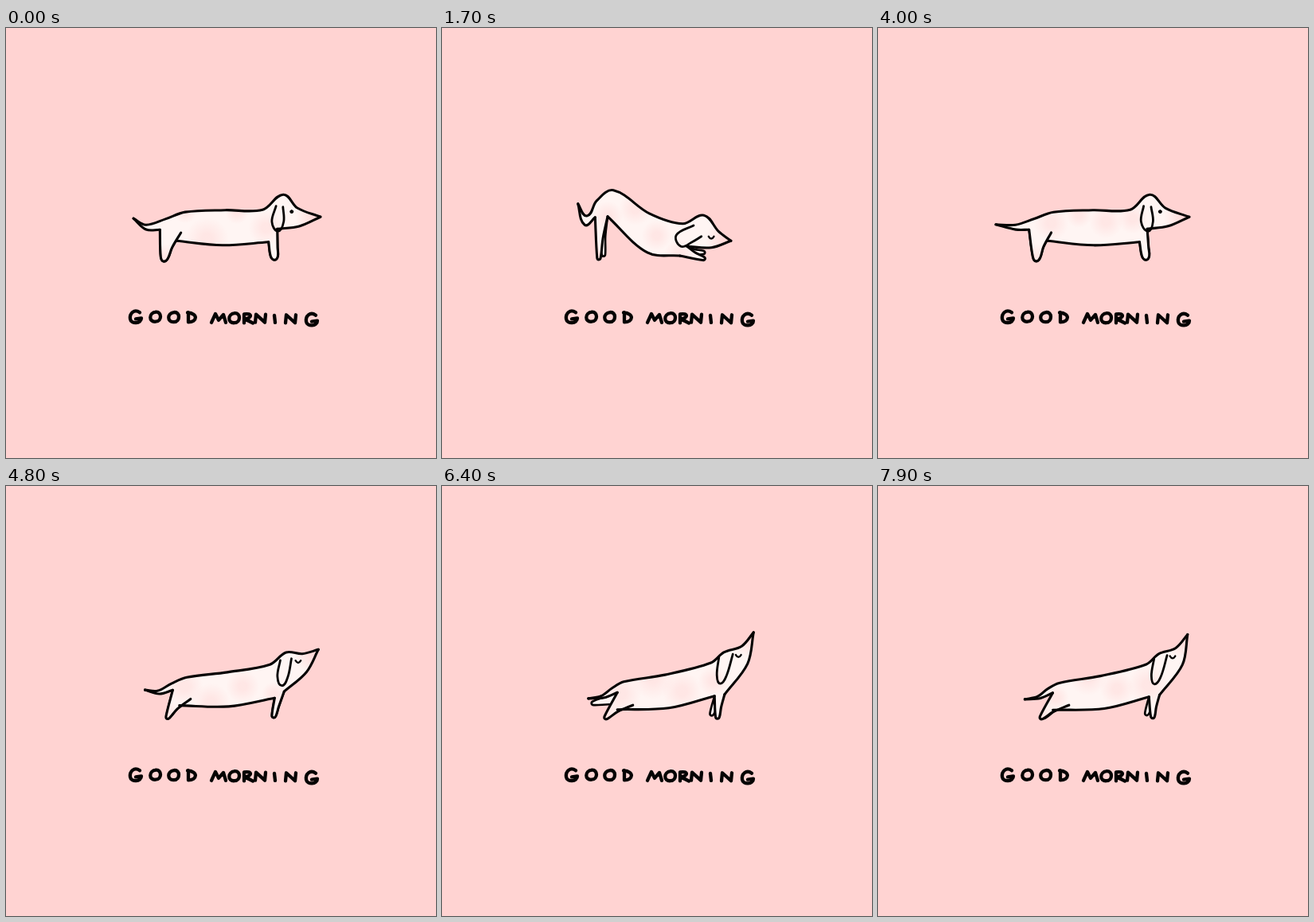
These frames come from a looping animation (540 px wide and 540 px high, 8000 ms). An HTML page with a canvas:

```html
<!DOCTYPE html>
<html lang="en">
<head>
<meta charset="utf-8">
<title>Good morning</title>
<style>
  html, body { margin: 0; width: 100%; height: 100%; overflow: hidden; background: #ffd3d2; }
  canvas { display: block; }
</style>
</head>
<body>
<canvas id="stage" width="540" height="540" role="img" aria-label="GOOD MORNING"></canvas>
<script>
const ctx = document.getElementById('stage').getContext('2d');
const LOOP = 8000, STEP = 100, GROUND = 291;
const INK = '#050303', PAPER = '#ffd3d2', FUR = '#fff5f3';

const each = (v, f) => Array.isArray(v) ? v.map(f)
  : Object.fromEntries(Object.entries(v).map(([k, x]) => [k, f(x, k)]));

// Blend two poses.
const mix = (a, b, k) => typeof a === 'number' ? a + (b - a) * k
  : each(a, (v, i) => mix(v, b[i], k));

// Move every point of a pose by a rule.
const warp = (v, f) => typeof v === 'number' ? v
  : typeof v[0] === 'number' ? f(...v)
  : each(v, x => warp(x, f));

const stretch = (pose, sx, sy) => warp(pose, (x, y) =>
  [197 + (x - 197) * sx, GROUND + (y - GROUND) * sy]);

// back: tail tip to nose; chest: nose to throat; belly: front leg to groin;
// hind: thigh, foot, heel.
const stand = {
  back: [[160, 239], [176, 247], [200, 240], [225, 231], [275, 229], [322, 228], [348, 209], [366, 226], [395, 237]],
  chest: [[395, 237], [368, 249], [341, 252]],
  belly: [[330, 269], [272, 273], [214, 267]],
  hind: [[220, 257], [198, 293], [193, 253]],
  under: [176, 253],
  ear: [[339, 224], [334, 243], [342, 255], [349, 243], [348, 225]],
  frontFoot: [337, 291], farFront: [337, 291], farHind: [198, 293],
  eye: [359, 231], shut: 0, paw: 4.5
};

const bow = {
  back: [[171, 221], [182, 236], [194, 217], [215, 204], [260, 233], [302, 246], [329, 235], [347, 255], [363, 267]],
  chest: [[363, 267], [338, 276], [308, 274]],
  belly: [[299, 286], [258, 282], [208, 237]],
  hind: [[208, 237], [197, 291], [192, 238]],
  under: [179, 247],
  ear: [[316, 248], [294, 260], [300, 274], [314, 269], [326, 262]],
  frontFoot: [330, 290], farFront: [330, 282], farHind: [203, 287],
  eye: [338, 263], shut: 1, paw: 2.2
};

const rise = {
  back: [[184, 267], [200, 264], [213, 254], [228, 246], [280, 237], [338, 222], [354, 209], [376, 201], [391, 184]],
  chest: [[391, 184], [384, 223], [355, 262]],
  belly: [[342, 264], [285, 279], [220, 281]],
  hind: [[240, 275], [204, 292], [220, 259]],
  under: [204, 266],
  ear: [[348, 215], [345, 237], [349, 248], [357, 238], [365, 211]],
  frontFoot: [346, 292], farFront: [338, 288], farHind: [188, 273],
  eye: [372, 213], shut: 1, paw: 2.5
};

const wag = warp(stand, (x, y) => [x - 0.08 * (GROUND - y), y]);
wag.back[0] = [148, 247];

const bowDeep = stretch(bow, 0.97, 1.05);
const bowPeak = stretch(bow, 0.95, 1.09);
const rest = { ...stretch(rise, 0.99, 0.975), farHind: [207, 291] };
const lean = {
  ...mix(stand, rise, 0.6),
  frontFoot: [336, 291], farFront: [336, 291], farHind: [202, 292], shut: 1, paw: 2.5
};

const KEYS = [
  [0, stand], [300, wag], [600, stand], [900, wag], [1200, wag],
  [1600, bow], [1700, bow], [2600, bowPeak], [3000, bowDeep], [3400, bowDeep],
  [3800, stand], [4000, wag], [4300, wag], [4700, lean], [4800, lean],
  [5300, rise], [6600, rise], [7200, rest], [LOOP, rest]
];

function poseAt(t) {
  const i = KEYS.findIndex(k => k[0] > t);
  const [t0, a] = KEYS[i - 1], [t1, b] = KEYS[i];
  return mix(a, b, (1 - Math.cos(Math.PI * (t - t0) / (t1 - t0))) / 2);
}

// Slight redrawn-line wobble, the same for points that meet.
const wobble = (pose, n) => warp(pose, (x, y) => [
  x + 0.3 * Math.sin(x * 0.11 + y * 0.07 + n * 2.3),
  y + 0.3 * Math.sin(x * 0.08 - y * 0.13 + n * 4.1)
]);

// Smooth curve through the points; handles are a third of each span.
function curve(path, pts, join) {
  const slope = i => {
    const a = pts[Math.max(i - 1, 0)], b = pts[Math.min(i + 1, pts.length - 1)];
    const d = Math.hypot(b[0] - a[0], b[1] - a[1]) || 1;
    return [(b[0] - a[0]) / d, (b[1] - a[1]) / d];
  };
  path[join ? 'lineTo' : 'moveTo'](...pts[0]);
  for (let i = 1; i < pts.length; i++) {
    const a = pts[i - 1], b = pts[i], u = slope(i - 1), v = slope(i);
    const h = Math.hypot(b[0] - a[0], b[1] - a[1]) / 3;
    path.bezierCurveTo(a[0] + u[0] * h, a[1] + u[1] * h, b[0] - v[0] * h, b[1] - v[1] * h, ...b);
  }
  return path;
}

// Tapered leg from its front edge, round the foot, to its rear edge.
function leg(front, foot, rear, r) {
  const top = mix(front, rear, 0.5);
  const d = Math.hypot(foot[0] - top[0], foot[1] - top[1]);
  const [ux, uy] = [(foot[0] - top[0]) / d, (foot[1] - top[1]) / d];
  const at = (along, side) => [
    top[0] + ux * along + uy * side,
    top[1] + uy * along - ux * side
  ];
  const half = ((front[0] - rear[0]) * uy - (front[1] - rear[1]) * ux) / 2;
  return [front, at(d / 2, r + (half - r) / 4), at(d - r, r), foot, at(d - r, -r), rear];
}

const line = (pts, width) => {
  ctx.lineWidth = width;
  ctx.stroke(curve(new Path2D(), pts));
};

function blot([x, y], r, alpha) {
  const g = ctx.createRadialGradient(x, y, r / 4, x, y, r);
  g.addColorStop(0, `rgba(255,213,212,${alpha})`);
  g.addColorStop(1, 'rgba(255,213,212,0)');
  ctx.fillStyle = g;
  ctx.fillRect(x - r, y - r, 2 * r, 2 * r);
}

const random = seed => {
  const s = Math.sin(seed * 12.9898) * 43758.5453;
  return s - Math.floor(s);
};

function drawDog(dog, n) {
  const [thigh, foot, heel] = dog.hind, throat = dog.chest[2], { belly, back, paw } = dog;
  const farLegs = [
    leg(thigh, dog.farHind, heel, paw),
    leg(throat, dog.farFront, belly[0], paw)
  ];
  const outline = [
    back, dog.chest, leg(throat, dog.frontFoot, belly[0], paw), belly,
    leg(thigh, foot, heel, paw), [heel, dog.under, back[0]]
  ];

  for (const far of farLegs) {
    ctx.fillStyle = FUR;
    ctx.fill(curve(new Path2D(), far));
    line(far, 2.7);
  }

  const body = new Path2D();
  outline.forEach((part, i) => curve(body, part, i));
  ctx.save();
  ctx.clip(body);
  ctx.fillStyle = FUR;
  ctx.fillRect(0, 0, 540, 540);
  for (let i = 0; i < 4; i++) {
    const spine = mix(back[3], back[5], i / 3), low = mix(belly[2], belly[0], i / 3);
    blot(mix(spine, low, random(n * 7 + i)), 14 + 14 * random(n * 5 + i), 0.45);
  }
  blot(back[8], 32, 0.9);
  blot(foot, 22, 0.5);
  ctx.restore();

  outline.forEach(part => line(part, 3.1));
  line(dog.ear, 2.8);

  // A dot when open, a small cup when shut.
  const [x, y] = dog.eye, w = 0.1 + dog.shut;
  ctx.lineWidth = 4.4 - 2 * dog.shut;
  ctx.beginPath();
  ctx.moveTo(x - 3 * w, y - w);
  ctx.quadraticCurveTo(x, y + 4 * w, x + 3 * w, y - w);
  ctx.stroke();
}

// Brush letters around their own centre.
const GLYPHS = {
  G: 'M5-5C-2-10-8-4-7 3C-6 10 7 9 7 2L0 3',
  O: 'M0-6C-9-5-9 7 0 6C8 6 8-7 0-6',
  D: 'M-4-6L-4 6C7 6 9-5-5-6',
  M: 'M-9 6L-4-5L0 3L6-4L9 6',
  R: 'M-5 6L-5-5C5-7 6 0-4 1L6 6',
  N: 'M-7 5L-6-5L5 5L6-5',
  I: 'M0-4L1 5'
};
const LETTER_X = [163, 188, 211, 233, 267, 287, 304, 320, 337, 358, 384];

function drawWords() {
  ctx.lineWidth = 4.3;
  [...'GOODMORNING'].forEach((c, i) => {
    const x = LETTER_X[i];
    ctx.save();
    ctx.translate(x, 362.3 + (x - 160) * 0.015);
    ctx.stroke(new Path2D(GLYPHS[c]));
    ctx.restore();
  });
}

function draw(t) {
  const n = Math.floor(t / STEP);
  ctx.fillStyle = PAPER;
  ctx.fillRect(0, 0, 540, 540);
  ctx.strokeStyle = INK;
  ctx.lineCap = ctx.lineJoin = 'round';
  drawDog(wobble(poseAt(n * STEP), n), n);
  drawWords();
}

const start = performance.now();
function tick() {
  draw((performance.now() - start) % LOOP);
  requestAnimationFrame(tick);
}
tick();
</script>
</body>
</html>
```
